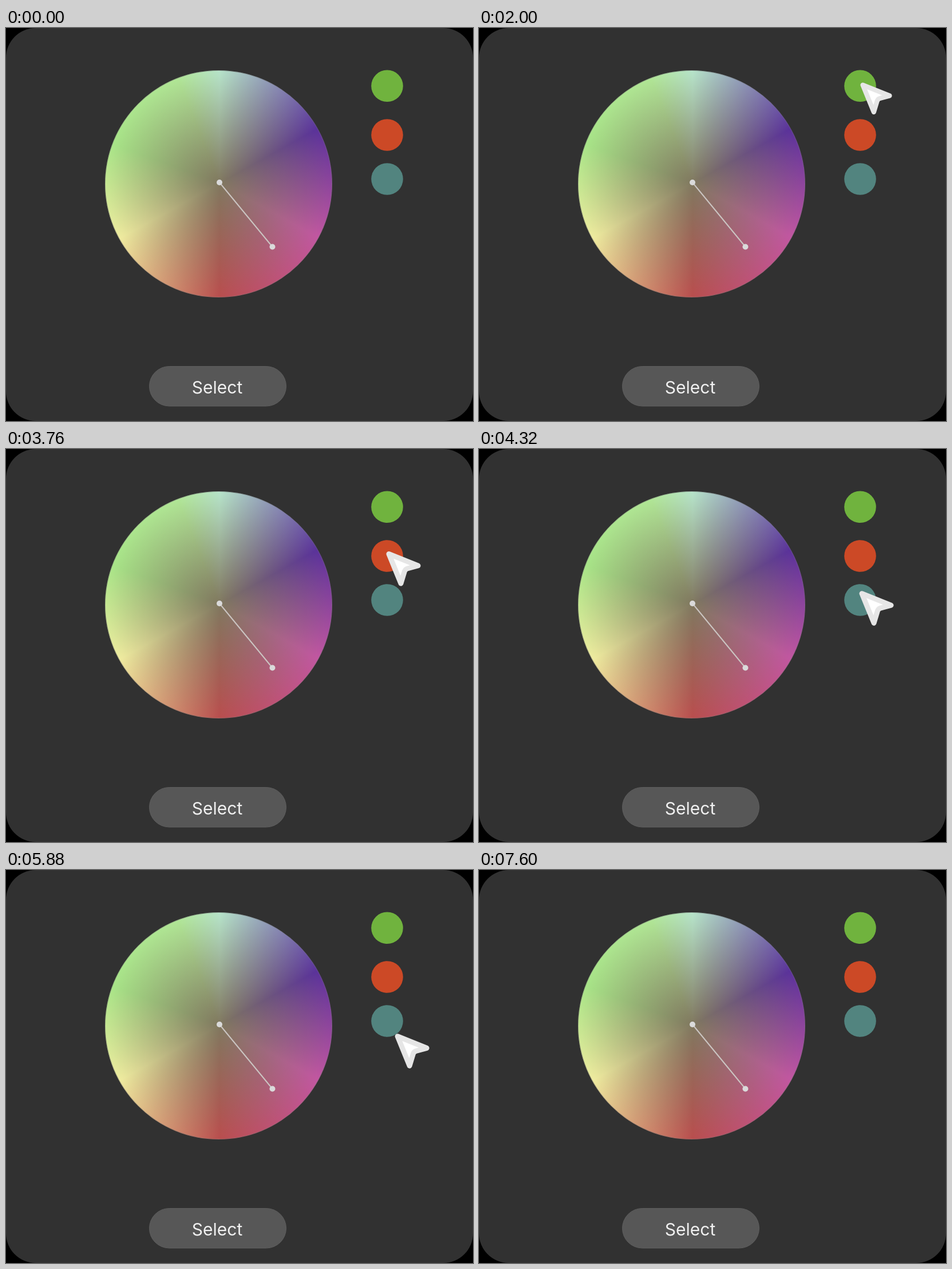
Recreate the animation shown at these times as an HTML page. Size 816 px wide and 687 px high, loop 9000 ms.

```html
<!DOCTYPE html>
<html lang="en">
<head>
<meta charset="utf-8">
<title>Color picker</title>
<style>
  html, body { margin: 0; width: 100%; height: 100%; overflow: hidden; background: #000; }
  .card { position: absolute; left: 0; top: 0; width: 816px; height: 687px; border-radius: 52px; background: #313131; }
  .wheel {
    position: absolute; left: 172.5px; top: 73.5px; width: 397px; height: 397px; border-radius: 50%;
    background:
      radial-gradient(circle 199px at 200.5px 197px, #80785f, #80785f00),
      conic-gradient(at 200.5px 197px,
        #b7e5cb 0deg, #59309c 61deg, #c356a2 119deg, #b94e4e 180deg,
        #efeb9f 241deg, #a8e588 290deg, #b1e796 338deg, #b7e5cb 360deg);
    box-shadow: inset 0 0 0 1px rgba(120, 120, 120, .45);
  }
  svg { position: absolute; left: 0; top: 0; display: block; }
  text { font: 30px Inter, Roboto, sans-serif; fill: #f0f0f0; text-anchor: middle; }
</style>
</head>
<body>
<div class="card"></div>
<div class="wheel"></div>
<svg width="816" height="687" viewBox="0 0 816 687">
  <g fill="#dadada">
    <path d="M373 270L465.5 382.5" stroke="#cbc5c2" stroke-width="2"/>
    <circle cx="373" cy="270" r="5"/>
    <circle cx="465.5" cy="382.5" r="5"/>
  </g>
  <circle cx="666" cy="101.3" r="27.8" fill="#70b33e"/>
  <circle cx="666" cy="187" r="27.8" fill="#cc4926"/>
  <circle cx="666" cy="264" r="27.8" fill="#52847f"/>
  <rect x="250.5" y="591.5" width="239" height="69.5" rx="34.75" fill="#575757" stroke="#5e5e5e"/>
  <text x="369" y="638.5">Select</text>
  <path id="cursor" d="M-25.5-25.5L25.5-5L7 0Q3.5 1 2 4.5L-4.5 26Z"
    fill="#fff" stroke="#e6e6e6" stroke-width="9" stroke-linejoin="round"/>
</svg>
<script>
const LOOP = 9000, STEP = 40;
const SHOW = 1320, HIDE = 6360;
const OUTSIDE = [848, 538];
const moves = [
  { start: 1200, length: 700, to: [694, 123] },
  { start: 2330, length: 750, to: [694.5, 209] },
  { start: 3830, length: 750, to: [694.5, 292] },
  { start: 5650, length: 790, to: OUTSIDE }
];
const clicks = [2000, 3500, 5320];
const CLICK_HALF = 180, CLICK_DEPTH = 0.08;
const cursor = document.getElementById('cursor');

const clamp = v => Math.min(1, Math.max(0, v));
const ease = p => p < 0.5 ? 4 * p ** 3 : 1 - 4 * (1 - p) ** 3;

function positionAt(t) {
  return moves.reduce((pos, { start, length, to }) => {
    const k = ease(clamp((t - start) / length));
    return pos.map((v, i) => v + (to[i] - v) * k);
  }, OUTSIDE);
}

function scaleAt(t) {
  return clicks.reduce((scale, peak) => {
    const near = clamp(1 - Math.abs(t - peak) / CLICK_HALF);
    return scale - CLICK_DEPTH * ease(near);
  }, 1);
}

function render(t) {
  const [x, y] = positionAt(t);
  cursor.setAttribute('visibility', t >= SHOW && t < HIDE ? 'visible' : 'hidden');
  cursor.setAttribute('transform', `translate(${x} ${y}) scale(${scaleAt(t)})`);
}

const origin = performance.now();
function tick() {
  const t = (performance.now() - origin) % LOOP;
  render(Math.floor(t / STEP) * STEP);
  requestAnimationFrame(tick);
}
tick();
</script>
</body>
</html>
```
